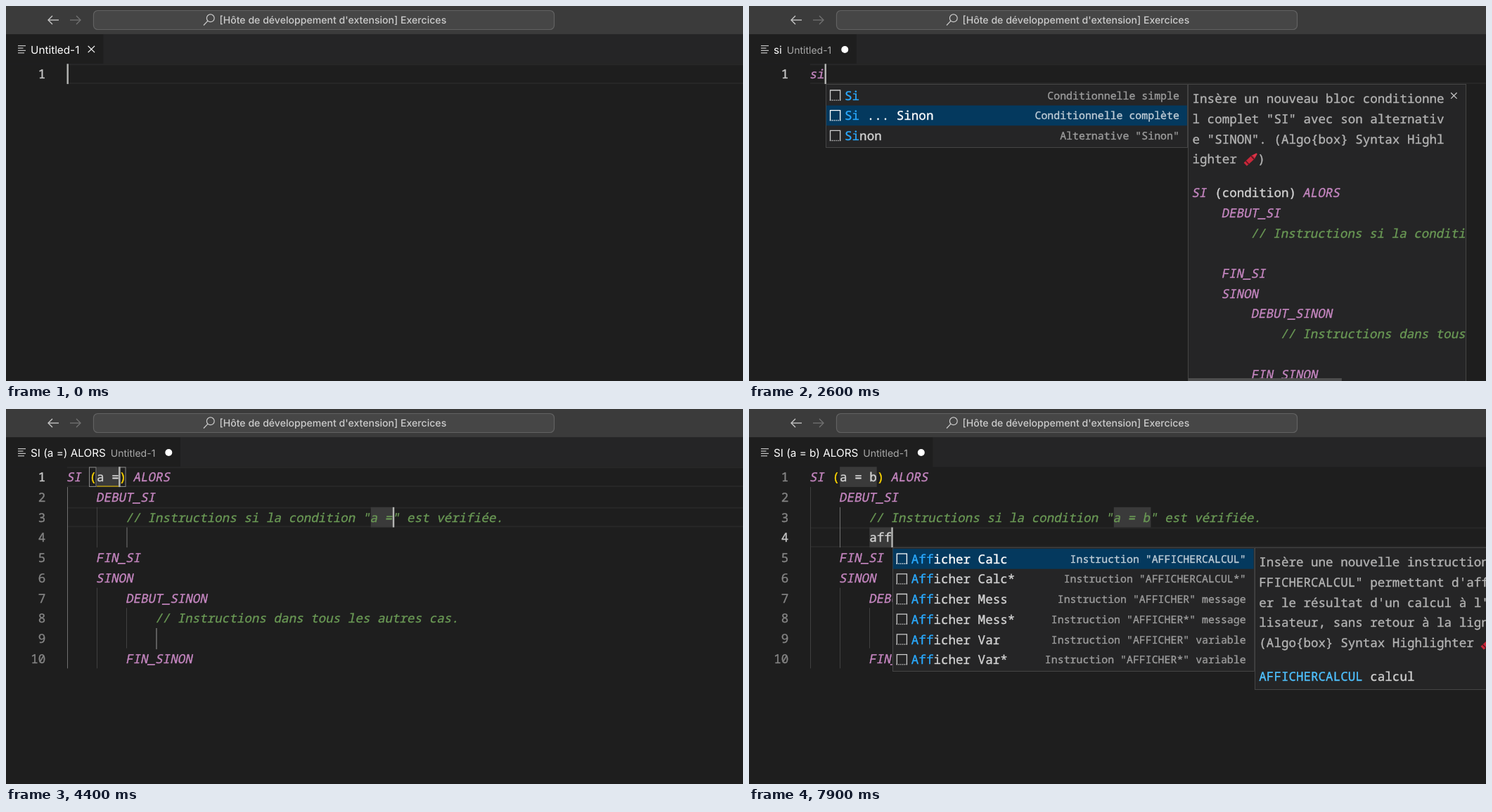
An HTML page with a canvas for the animation above (8 s loop, 1048 by 534 pixels).

```html
<!DOCTYPE html>
<html lang="fr">
<head>
<meta charset="utf-8">
<title>Algo snippets</title>
<style>
html, body { margin: 0; width: 100%; height: 100%; overflow: hidden; background: #1e1e1e; }
canvas { display: block; }
</style>
</head>
<body>
<canvas id="stage" width="1048" height="534"></canvas>
<script>
const ctx = document.getElementById('stage').getContext('2d');
ctx.textRendering = 'geometricPrecision';

const LOOP = 8000;
const CW = 10.53, ROW = 28.7, TOP = 82.4, LEFT = 87;
const UI = 'Inter, sans-serif', MONO = '"Noto Sans Mono", monospace';
const KEY = '#c586c0', NOTE = '#6a9955', TEXT = '#d4d4d4', GOLD = '#ffd700', MATCH = '#2aaaff', DOC = '#b4b4b4';

const colX = c => LEFT + c * CW;
const rowY = r => TOP + r * ROW;

function rect(x, y, w, h, color) {
  ctx.fillStyle = color;
  ctx.fillRect(x, y, w, h);
}

function frame(x, y, w, h, fill, stroke) {
  rect(x, y, w, h, fill);
  ctx.strokeStyle = stroke;
  ctx.lineWidth = 1;
  ctx.strokeRect(Math.round(x) + .5, Math.round(y) + .5, Math.round(w) - 1, Math.round(h) - 1);
}

function path(points, color, width = 1.2) {
  ctx.strokeStyle = color;
  ctx.lineWidth = width;
  ctx.beginPath();
  for (const [i, [x, y]] of points.entries()) i ? ctx.lineTo(x, y) : ctx.moveTo(x, y);
  ctx.stroke();
}

function label(text, x, y, size, color, weight = 400) {
  ctx.font = `${weight} ${size}px ${UI}`;
  ctx.fillStyle = color;
  ctx.fillText(text, x, y);
}

// Monospaced text on a fixed grid, centred on cy; a hairline stroke adds weight
function mono(text, x, cy, color, slanted = false, cell = CW) {
  const size = cell / .6, slant = slanted ? .2 : 0;
  ctx.save();
  ctx.transform(1, 0, -slant, 1, slant * cy, 0);
  ctx.font = `${size}px ${MONO}`;
  ctx.fillStyle = ctx.strokeStyle = color;
  ctx.lineWidth = .35;
  [...text].forEach((ch, i) => {
    if (ch === ' ') return;
    ctx.fillText(ch, x + i * cell, cy + size * .362);
    ctx.strokeText(ch, x + i * cell, cy + size * .362);
  });
  ctx.restore();
}

// Segments are [text, color]; keywords and comments are slanted
function spans(segs, x, cy) {
  for (const [text, color] of segs) {
    mono(text, x, cy, color, color === KEY || color === NOTE);
    x += text.length * CW;
  }
}

function cross(x, y, r, color) {
  path([[x - r, y - r], [x + r, y + r]], color);
  path([[x + r, y - r], [x - r, y + r]], color);
}

function crayon(x, y) {
  ctx.save();
  ctx.translate(x + 9.5, y);
  ctx.rotate(-.75);
  rect(-11, -3.2, 16, 6.4, '#c8283a');
  rect(-8, -3.2, 1.6, 6.4, '#5a1420');
  rect(2.4, -3.2, 1.6, 6.4, '#5a1420');
  ctx.fillStyle = '#dd3347';
  ctx.beginPath();
  ctx.moveTo(5, -2.8);
  ctx.lineTo(11.5, -.8);
  ctx.lineTo(11.5, .8);
  ctx.lineTo(5, 2.8);
  ctx.fill();
  ctx.restore();
}

function arrow(x, dir, color) {
  path([[x - 7.5, 20], [x + 7.5, 20]], color, 1.3);
  const tip = x + dir * 7.5, back = tip - dir * 6;
  path([[back, 14], [tip, 20], [back, 26]], color, 1.3);
}

function titleBar() {
  rect(0, 0, 1048, 40.5, '#3b3b3b');
  arrow(67.5, -1, '#cccccc');
  arrow(98.5, 1, '#737373');
  ctx.beginPath();
  ctx.roundRect(124.5, 6.5, 655, 27, 6);
  ctx.fillStyle = '#464646';
  ctx.fill();
  ctx.strokeStyle = '#626262';
  ctx.lineWidth = 1.2;
  ctx.stroke();
  ctx.strokeStyle = '#cccccc';
  ctx.beginPath();
  ctx.arc(290.8, 17.3, 5.4, 0, 7);
  ctx.stroke();
  path([[287, 21.2], [281, 27.5]], '#cccccc');
  label("[Hôte de développement d'extension] Exercices", 303.5, 25, 14.1, '#cccccc', 500);
}

function tab(name) {
  rect(0, 40.5, 1048, 42, '#252526');
  ctx.font = `15.3px ${UI}`;
  const end = 35 + ctx.measureText(name || 'Untitled-1').width;
  rect(0, 40.5, name ? end + 106 : end + 34, 42, '#1e1e1e');
  [11, 7.5, 11, 9].forEach((w, i) => rect(17, 56 + i * 3.4, w, 1.2, '#c5c5c5'));
  label(name || 'Untitled-1', 35, 67.5, 15.3, '#ffffff');
  if (!name) return cross(end + 17, 61.5, 4.7, '#ffffff');
  label('Untitled-1', end + 7, 67.5, 14, '#a9a9a9');
  ctx.fillStyle = '#ffffff';
  ctx.beginPath();
  ctx.arc(end + 89.5, 62, 5, 0, 7);
  ctx.fill();
}

function numbers(count, active) {
  for (let i = 0; i < count; i++) {
    const s = String(i + 1);
    mono(s, 56.3 - s.length * CW, rowY(i) + 14.6, i === active ? '#c6c6c6' : '#858585');
  }
}

function lineBorder(row) {
  rect(LEFT, rowY(row), 1048, 1.8, '#282828');
  rect(LEFT, rowY(row) + ROW - 2, 1048, 1.8, '#282828');
}

const mark = (row, col, len, color) => rect(colX(col), rowY(row), len * CW, ROW, color);
const guide = (col, from, to, color, w = 1) => rect(Math.floor(colX(col)), rowY(from), w, (to - from) * ROW, color);
const caret = (row, col) => rect(colX(col) - .5, rowY(row), 2.4, ROW, '#b4b5b3');

function ifBlock(comment) {
  return [
    [['SI', KEY], [' (condition) ', TEXT], ['ALORS', KEY]],
    [['    DEBUT_SI', KEY]],
    [['        // ' + comment, NOTE]],
    [],
    [['    FIN_SI', KEY]]
  ];
}
const elseBlock = [
  [['    SINON', KEY]],
  [['        DEBUT_SINON', KEY]],
  [['            // Instructions dans tous les autres cas.', NOTE]],
  [],
  [['        FIN_SINON', KEY]]
];
const simple = ifBlock('Instructions si la condition est vérifiée.');

const siItems = [
  ['Si', 'Conditionnelle simple'],
  ['Si ... Sinon', 'Conditionnelle complète'],
  ['Sinon', 'Alternative "Sinon"']
];
const showItems = [
  ['Calc', '"AFFICHERCALCUL"'], ['Calc*', '"AFFICHERCALCUL*"'],
  ['Mess', '"AFFICHER" message'], ['Mess*', '"AFFICHER*" message'],
  ['Var', '"AFFICHER" variable'], ['Var*', '"AFFICHER*" variable']
].map(([a, b]) => ['Afficher ' + a, 'Instruction ' + b]);

// A "~" in a help text stands for the crayon
const siHelp = [
  {
    doc: ['Insère un nouveau bloc conditionne', 'l "SI", sans alternative "SINON".', '(Algo{box} Syntax Highlighter ~)'],
    code: simple
  },
  {
    doc: ['Insère un nouveau bloc conditionne', 'l complet "SI" avec son alternativ', 'e "SINON". (Algo{box} Syntax Highl', 'ighter ~)'],
    code: [...simple, ...elseBlock], scroll: true
  }
];
const showHelp = {
  doc: ['Insère une nouvelle instruction "A', "FFICHERCALCUL\" permettant d'affich", "er le résultat d'un calcul à l'uti", 'lisateur, sans retour à la ligne. ', '(Algo{box} Syntax Highlighter ~)'],
  code: [[['AFFICHERCALCUL', '#4fc1ff'], [' calcul', TEXT]]]
};

function snippetIcon(x, y, color) {
  path([[x + .7, y + 15], [x + .7, y + .7], [x + 14.8, y + .7], [x + 14.8, y + 15]], color, 1.3);
  for (let i = 0; i < 6; i++) rect(x + i * 2.8, y + 14.2, 1.4, 1.4, color);
}

function popup(x, row, items, typed, selected, help) {
  const y = rowY(row + 1);
  frame(x, y, 515, items.length * ROW + 4.4, '#252526', '#454545');
  items.forEach(([name, detail], i) => {
    const cy = y + 16.2 + i * ROW, on = i === selected;
    if (on) rect(x + 1, cy - 14.4, 513, ROW, '#04395e');
    snippetIcon(x + 6, cy - 8, on ? '#ffffff' : '#cccccc');
    const tx = x + 27.2, cell = 8.93;
    mono(name.slice(0, typed), tx, cy, MATCH);
    mono(name.slice(typed), tx + typed * CW, cy, on ? '#ffffff' : TEXT);
    mono(detail, x + 503 - detail.length * cell, cy, on ? '#c0cdd7' : '#9d9d9d', false, cell);
  });
  helpPanel(x + 515, y, help);
}

function helpPanel(x, y, { doc, code, scroll }) {
  const h = (doc.length + code.length) * ROW + 30.5, tx = x + 6.7;
  frame(x, y, 396, h, '#252526', '#454545');
  ctx.save();
  ctx.beginPath();
  ctx.rect(x, y, 395, h);
  ctx.clip();
  doc.forEach((line, i) => {
    const cy = y + 20.8 + i * ROW, [before, after] = line.split('~');
    mono(before, tx, cy, DOC);
    if (after === undefined) return;
    const ex = tx + before.length * CW;
    crayon(ex, cy);
    mono(after, ex + 19, cy, DOC);
  });
  const codeY = y + 40 + doc.length * ROW;
  code.forEach((segs, i) => spans(segs, tx, codeY + i * ROW));
  ctx.restore();
  cross(x + 378.5, y + 16.6, 4.2, '#cccccc');
  if (scroll) rect(x + 1, 530, 218, 4, '#4d4d4d');
}

// Each step: start time and what changes
const steps = [
  { at: 0, word: '', from: 200 },
  { at: 1000, word: 's' },
  { at: 1050, word: 's', from: 1000, pick: 0 },
  { at: 1300, word: 'si', pick: 0 },
  { at: 2100, word: 'si', from: 1300, pick: 1 },
  { at: 3400, cond: 'condition', chosen: true },
  { at: 3900, cond: 'a' },
  { at: 4100, cond: 'a ' },
  { at: 4300, cond: 'a =' },
  { at: 4700, cond: 'a = ' },
  { at: 5000, cond: 'a = b' },
  { at: 5700, cond: 'a = b', body: '' },
  { at: 7000, cond: 'a = b', body: 'a' },
  { at: 7200, cond: 'a = b', body: 'af', list: true },
  { at: 7500, cond: 'a = b', body: 'aff', list: true }
];

function firstWord({ word, pick }, blinkOn) {
  tab(word);
  lineBorder(0);
  numbers(1, 0);
  spans([[word, word === 'si' ? KEY : TEXT]], LEFT, rowY(0) + 14.6);
  if (blinkOn) caret(0, word.length);
  if (pick !== undefined) popup(colX(word.length) + .8, 0, siItems, word.length, pick, siHelp[pick]);
}

function snippet({ cond, chosen, body, list }, blinkOn) {
  const n = cond.length, inBody = body !== undefined, quoteCol = 41;
  const bright = '#707070', dim = '#404040';
  tab(`SI (${cond.trimEnd()}) ALORS`);
  if (inBody) lineBorder(3);
  else if (!chosen) [0, 2].forEach(lineBorder);
  numbers(10, inBody ? 3 : 0);

  const fill = chosen ? '#3d5878' : '#3a3a3a';
  mark(0, 4, n, fill);
  mark(2, quoteCol, n, fill);
  if (chosen) mark(2, 30, 9, '#333b3f');
  if (body) mark(3, 8, body.length, '#3a3a3a');

  guide(0, 1, 10, inBody ? dim : bright);
  guide(4, 2, 4, inBody ? bright : dim);
  guide(4, 6, 10, dim);
  guide(8, 7, 9, dim);
  if (!inBody) guide(8, 3, 4, '#4a4a4a', 2);
  guide(12, 8, 9.05, '#5c5c5c', 2);

  if (!inBody) {
    if (!chosen) for (const c of [3, 4 + n]) {
      ctx.strokeStyle = '#888888';
      ctx.lineWidth = 1;
      ctx.strokeRect(Math.floor(colX(c)) + .5, rowY(0) + .6, CW - 1, ROW - 1.2);
    }
    rect(colX(4), rowY(0) + 27, n * CW, 1.3, '#c9a80c');
  }

  const lines = [
    [['SI ', KEY], ['(', GOLD], [cond, TEXT], [')', GOLD], [' ALORS', KEY]],
    ...ifBlock(`Instructions si la condition "${cond}" est vérifiée.`).slice(1),
    ...elseBlock
  ];
  lines[3] = [['        ' + (body || ''), TEXT]];
  lines.forEach((segs, i) => spans(segs, LEFT, rowY(i) + 14.6));

  if (blinkOn) {
    if (inBody) caret(3, 8 + body.length);
    else {
      caret(0, 4 + n);
      caret(2, quoteCol + n);
    }
  }
  if (list) popup(colX(8 + body.length) + .8, 3, showItems, body.length, 0, showHelp);
}

function draw() {
  const t = performance.now() % LOOP;
  const step = steps.findLast(s => s.at <= t);
  const age = t - (step.from ?? step.at);
  const blinkOn = age < 0 || age % 1000 < 500;
  rect(0, 0, 1048, 534, '#1e1e1e');
  titleBar();
  (step.cond ? snippet : firstWord)(step, blinkOn);
  requestAnimationFrame(draw);
}
draw();
</script>
</body>
</html>
```
